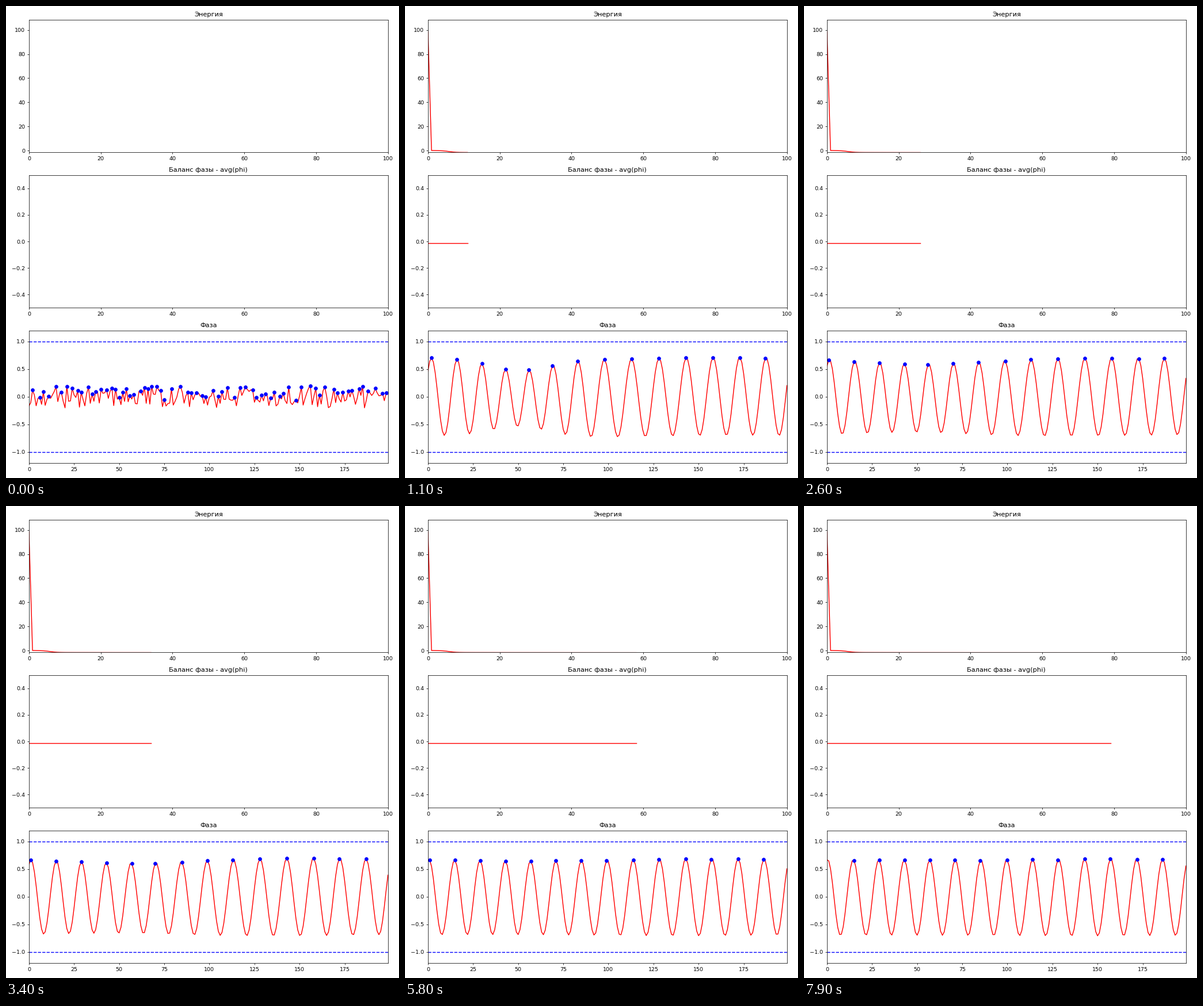
These frames come from a looping animation (683 by 820 pixels, 8000 ms). A matplotlib script:

```python
import numpy as np
import matplotlib.pyplot as plt
from matplotlib.animation import FuncAnimation

W, H, DPI = 683, 820, 68.3
FRAMES, INTERVAL = 80, 100
N, WAVES = 200, 14
SETTLED = 11            # step at which the stripes are fully formed
DECAY = 0.026           # relaxation rate of the longest mode
SPREAD = 2 * DECAY * (N / (2 * np.pi)) ** 2
MEAN, REST_AMP = -0.012, 0.705

x = np.arange(N)
grid = np.linspace(-N / 4, 1.25 * N, 3000)


def logistic(v):
    return 1 / (1 + np.exp(-v))


def mode(m, size, lead, u, t):
    """One periodic mode, fading by diffusion."""
    return size * np.exp(-DECAY * m * m * t) * np.cos(2 * np.pi * m * u / N + lead)


def shift(u, t):
    return mode(1, 2.17, 0.25, u, t) + mode(2, 0.445, -1.93, u, t)


def dip(u, t):
    """Weak spot in the stripes that widens and fills up."""
    var = 300 + SPREAD * t
    d = (u - 51 + N / 2) % N - N / 2
    return 0.2 * np.exp(-0.012 * t - d * d / (2 * var)) * np.sqrt(300 / var)


def low_pass(values, sigma):
    k = 2 * np.pi * np.fft.rfftfreq(N)
    return np.fft.irfft(np.fft.rfft(values) * np.exp(-(k * sigma) ** 2 / 2), N)


def phase(step):
    if step == 0:
        return noise
    t = max(step - SETTLED, 0)
    u = np.interp(x, grid + shift(grid, t), grid)
    weak = dip(u, t)
    wave = (REST_AMP - weak) * np.cos(2 * np.pi * WAVES * u / N)
    wave += mode(1, 0.022, 0.9, u, t)
    if step < SETTLED:
        start = 6 + 10 * weak
        wave *= np.sqrt(logistic(step - start) / logistic(SETTLED - start))
        wave += soft * np.exp(-0.5 * step) * (1 - step / SETTLED)
    return MEAN + wave


def maxima(y):
    return 1 + np.flatnonzero((y[1:-1] > y[:-2]) & (y[1:-1] > y[2:]))


noise = np.random.default_rng(3).uniform(-0.2, 0.2, N)
soft = low_pass(noise - noise.mean(), 1.8)
steps = np.arange(FRAMES)
energy = -1.58 * logistic(steps - 5.8) - 0.2 * (1 - np.exp(-steps / 40))
energy[0], energy[1] = 98.6, 0.0
balance = np.full(FRAMES, MEAN)

# The small surplus guards against rounding down to one pixel less
fig, (ax_e, ax_b, ax_p) = plt.subplots(
    3, 1, figsize=((W + 0.01) / DPI, (H + 0.01) / DPI), dpi=DPI)

ax_e.set(title="Энергия", xlim=(0, 100), ylim=(-1.55, 108.5))
ax_b.set(title="Баланс фазы - avg(phi)", xlim=(0, 100), ylim=(-0.5, 0.5))
ax_p.set(title="Фаза", xlim=(0, N - 1), ylim=(-1.2, 1.2))

energy_line, = ax_e.plot([], [], "r-")
balance_line, = ax_b.plot([], [], "r-")
for level in (1, -1):
    ax_p.axhline(level, color="b", ls="--")
phase_line, = ax_p.plot([], [], "r-")
peak_dots, = ax_p.plot([], [], "bo")
fig.tight_layout()


def update(step):
    seen = slice(0, step + 1)
    energy_line.set_data(steps[seen], energy[seen])
    balance_line.set_data(steps[seen], balance[seen])
    y = phase(step)
    peaks = maxima(y)
    phase_line.set_data(x, y)
    peak_dots.set_data(peaks, y[peaks])
    return energy_line, balance_line, phase_line, peak_dots


anim = FuncAnimation(fig, update, frames=FRAMES, interval=INTERVAL,
                     repeat=True, repeat_delay=0)
plt.show()
```
